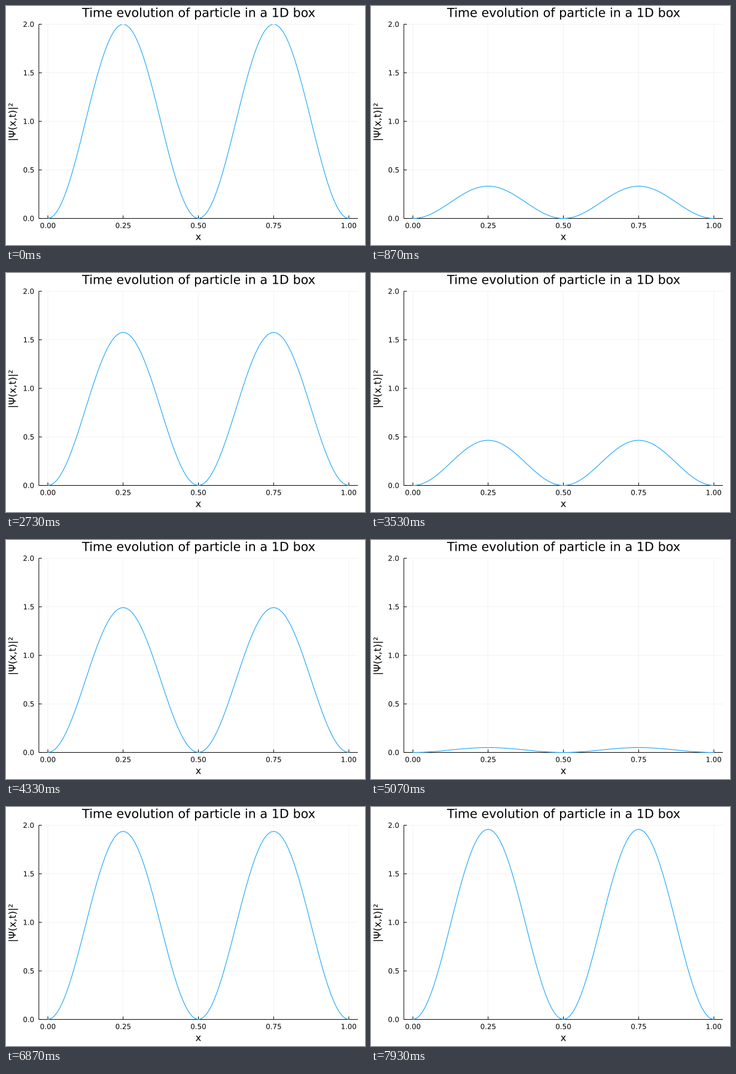
Animation of 600x400 px, one loop 8 s. Source, as a matplotlib script:

```python
import numpy as np
import matplotlib.pyplot as plt
from matplotlib.animation import FuncAnimation
from matplotlib.patches import PathPatch, Rectangle
from matplotlib.path import Path
from matplotlib.textpath import TextPath
from matplotlib.transforms import Affine2D

W, H, DPI = 600, 400, 100
STEPS, LOOP = 120, 8000           # wave states and loop length in ms
TICK = 20                         # ms per drawn frame
PX = 72 / DPI
FONT = 1.482                      # pixels per nominal font point
LEFT, RIGHT, TOP, BOTTOM = 54.9, 588.1, 30.55, 355.55
BLUE = "#009AFA"

N = 2                             # quantum number
ENERGY = (N * np.pi) ** 2 / 2
DT = 0.02

fig = plt.figure(figsize=(W / DPI, H / DPI), dpi=DPI, facecolor="white")
ax = fig.add_axes([0, 0, 1, 1])
ax.set_xlim(0, W)
ax.set_ylim(H, 0)
ax.axis("off")


def px(x):
    return 70 + 503 * x


def py(y):
    return BOTTOM - (BOTTOM - TOP) * y / 2


def label(text, x, base, points, align=0.5, angle=0):
    """Outline text with its ink aligned on x and its baseline at base."""
    path = TextPath((0, 0), text, size=points * FONT,
                    prop={"family": "DejaVu Sans"})
    box = path.get_extents()
    move = (Affine2D().translate(-box.x0 - align * box.width, 0)
            .scale(1, -1).rotate_deg(angle).translate(x, base))
    return move.transform_path(path)


x_ticks = np.linspace(0, 1, 5)
y_ticks = np.linspace(0, 2, 5)

grid = dict(color="black", alpha=0.1, lw=0.5 * PX, snap=False)
ax.vlines(px(x_ticks), TOP, BOTTOM, **grid)
ax.hlines(py(y_ticks), LEFT, RIGHT, **grid)

edge = dict(color="black", lw=PX, snap=False)
ax.hlines(BOTTOM, LEFT, RIGHT, **edge)
ax.vlines(LEFT, TOP, BOTTOM, **edge)
ax.vlines(px(x_ticks), BOTTOM - 5, BOTTOM, **edge)
ax.hlines(py(y_ticks), LEFT, LEFT + 5, **edge)

labels = [
    label("Time evolution of particle in a 1D box", 321.7, 18.4, 14),
    label("x", 321.5, 391.6, 11),
    label("|Ψ(x,t)|²", 16.3, 193.6, 11, angle=-90),
]
labels += [label(f"{v:.2f}", px(v), 371.6, 8) for v in x_ticks]
labels += [label(f"{v:.1f}", 46.4, py(v) + 4.3, 8, align=1) for v in y_ticks]
ax.add_patch(PathPatch(Path.make_compound_path(*labels), fc="black", lw=0,
                       snap=False))

xs = np.linspace(0, 1, 101)
shape = np.sqrt(2) * np.sin(N * np.pi * xs)
curve, = ax.plot([], [], color=BLUE, lw=PX, snap=False, zorder=3)
curve.set_clip_path(Rectangle((LEFT, TOP), RIGHT - LEFT, BOTTOM - TOP,
                              transform=ax.transData))
ax.set_xlim(0, W)
ax.set_ylim(H, 0)


def update(frame):
    # States change on a 10 ms clock, nearest to their even spacing.
    step = (frame * TICK + 15) * STEPS // LOOP
    psi = shape * np.cos(ENERGY * DT * step)
    curve.set_data(px(xs), py(psi ** 2))
    return curve,


anim = FuncAnimation(fig, update, frames=LOOP // TICK, interval=TICK,
                     repeat=True, repeat_delay=0)
plt.show()
```
